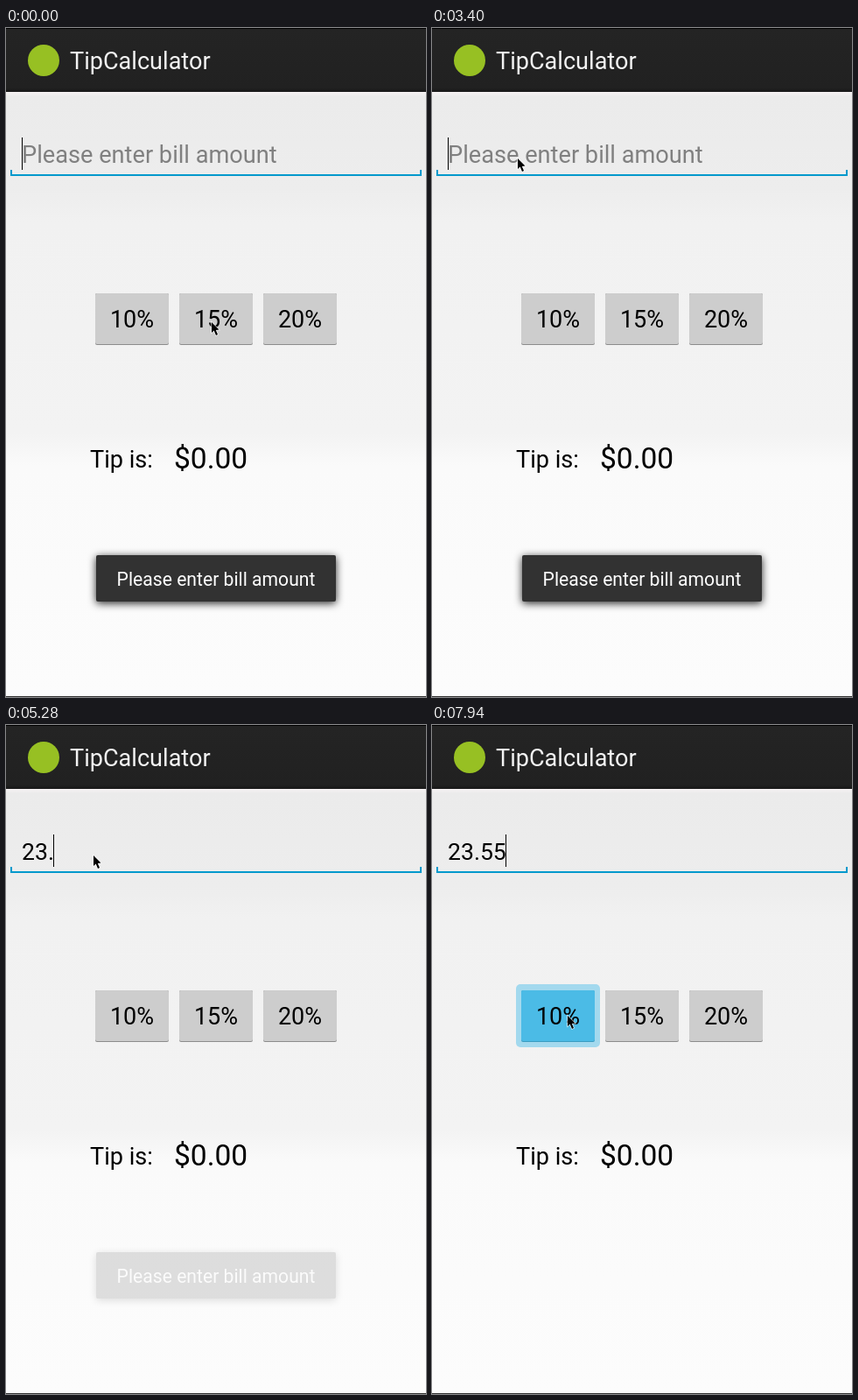
Write an HTML page with a canvas that moves like this. It is 480x764 px and loops after 8000 ms.

```html
<!DOCTYPE html>
<html lang="en">
<head>
<meta charset="utf-8">
<title>TipCalculator</title>
<style>
  html, body { margin: 0; width: 100%; height: 100%; overflow: hidden; background: #fbfbfb; }
  canvas { display: block; width: 480px; height: 764px; }
</style>
</head>
<body>
<canvas id="stage" width="480" height="764"></canvas>
<script>
const stage = document.getElementById('stage');
let ctx = stage.getContext('2d');

const LOOP = 8000;
const HINT = 'Please enter bill amount';
const AMOUNT = '23.55';
const FIELD_X = 18;
const BLINK = 500;
const HOLO_BLUE = '#0099cc';

const keyTimes = [4110, 4360, 5280, 5830, 5935];
const pressTimes = { '10%': 7940, '15%': 150, '20%': 1920 };
const pressLength = 150;

// The toast is replaced by the next one at a fixed interval; the last one fades out.
const toast = { first: 740, every: 2090, count: 3, fade: 480 };

const mouseStart = [235, 336];
const mouseMoves = [
  { start: 700, length: 430, to: [324, 339] },
  { start: 2100, length: 600, to: [98, 149] },
  { start: 3500, length: 100, to: [100, 149] },
  { start: 6430, length: 10, to: [111, 149] },
  { start: 6990, length: 10, to: [111, 190] },
  { start: 7010, length: 740, to: [155, 332] }
];

const ease = p => (1 - Math.cos(Math.PI * Math.min(1, Math.max(0, p)))) / 2;

function mouseAt(time) {
  let [x, y] = mouseStart;
  for (const { start, length, to } of mouseMoves) {
    const p = ease((time - start) / length);
    x += (to[0] - x) * p;
    y += (to[1] - y) * p;
  }
  return [x, y];
}

function toastAlpha(time) {
  const { first, every, count, fade } = toast;
  const index = Math.floor((time - first) / every);
  if (index < 0) return 1;
  if (index >= count) return 0;
  const p = ease((time - first - index * every) / fade);
  return index === count - 1 ? 1 - p : 1 - p * (1 - p);
}

function fieldAt(time) {
  const typed = keyTimes.filter(key => key <= time).length;
  const since = time - (typed ? keyTimes[typed - 1] : 0);
  return { value: AMOUNT.slice(0, typed), caret: Math.floor(since / BLINK) % 2 === 0 };
}

function rect(x, y, w, h, color) {
  ctx.fillStyle = color;
  ctx.fillRect(x, y, w, h);
}

function roundRect(x, y, w, h, r, color) {
  ctx.fillStyle = color;
  ctx.beginPath();
  ctx.roundRect(x, y, w, h, r);
  ctx.fill();
}

function text(str, x, y, size, color, align = 'left') {
  ctx.font = size + 'px Roboto, sans-serif';
  ctx.textAlign = align;
  ctx.fillStyle = color;
  ctx.fillText(str, x, y);
}

function vertical(y0, y1, stops) {
  const g = ctx.createLinearGradient(0, y0, 0, y1);
  for (const [y, color] of stops) g.addColorStop((y - y0) / (y1 - y0), color);
  return g;
}

const pageFill = vertical(73, 764, [
  [73, '#f6f2f3'], [78, '#ebebeb'], [185, '#ededed'], [222, '#f1f1f1'],
  [462, '#f3f3f3'], [500, '#fafafa'], [764, '#fcfcfc']
]);
const barFill = vertical(0, 73, [[0, '#242424'], [68, '#212121'], [73, '#181818']]);

function drawPage() {
  rect(0, 0, 480, 764, pageFill);
  rect(0, 0, 480, 73, barFill);
  rect(0, 0, 480, 1, '#000');
  rect(0, 763, 480, 1, '#333');
  roundRect(25, 19, 36, 36, 18, '#97c023');
  text('TipCalculator', 73, 47, 27.1, '#f3f3f3');
  text('Tip is:', 96, 502, 27.1, '#000');
  text('$0.00', 192, 503, 33.5, '#000');
}

function drawField({ value, caret }) {
  rect(5, 167, 470, 2, HOLO_BLUE);
  for (const x of [5, 473]) rect(x, 162, 2, 6, HOLO_BLUE);
  if (value) text(value, FIELD_X, 154, 26.6, '#000');
  else text(HINT, FIELD_X, 154, 27.2, '#808080');
  if (caret) {
    const width = value ? ctx.measureText(value).width : 0;
    rect(Math.floor(FIELD_X + width), 125, 1, 37, '#000');
  }
}

function drawButton(label, x, pressed) {
  if (pressed) roundRect(x - 6, 296, 96, 72, 5, '#a3d9ee');
  roundRect(x, 303, 84, 59, 2, pressed ? '#3b9cc1' : '#8c8c8c');
  roundRect(x, 303, 84, 58, 2, pressed ? '#4bbbe6' : '#cdcdcd');
  text(label, x + 42, 342, 27, '#000', 'center');
}

// Painted once on its own layer, so that fading treats box, shadow and text as one.
function makeToast() {
  const layer = document.createElement('canvas');
  layer.width = stage.width;
  layer.height = stage.height;
  const page = ctx;
  ctx = layer.getContext('2d');
  ctx.shadowColor = 'rgba(0,0,0,0.85)';
  ctx.shadowBlur = 10;
  ctx.shadowOffsetY = 2;
  roundRect(103, 602, 274, 53, 2, '#323232');
  ctx.shadowColor = 'transparent';
  text(HINT, 240, 637, 21.15, '#fff', 'center');
  ctx = page;
  return layer;
}
const toastLayer = makeToast();

function drawToast(alpha) {
  ctx.globalAlpha = alpha;
  ctx.drawImage(toastLayer, 0, 0);
  ctx.globalAlpha = 1;
}

const pointer = new Path2D('M0 0V12L2.7 9.6L5 15L7 14L4.8 9L8.5 8.6Z');

function drawMouse([x, y]) {
  ctx.save();
  ctx.translate(Math.round(x), Math.round(y));
  ctx.strokeStyle = 'rgba(255,255,255,0.8)';
  ctx.lineWidth = 1.4;
  ctx.stroke(pointer);
  ctx.fillStyle = '#000';
  ctx.fill(pointer);
  ctx.restore();
}

function draw(time) {
  drawPage();
  drawField(fieldAt(time));
  Object.entries(pressTimes).forEach(([label, start], i) => {
    drawButton(label, 102 + 96 * i, time >= start && time < start + pressLength);
  });
  drawToast(toastAlpha(time));
  drawMouse(mouseAt(time));
}

const begin = performance.now();
function tick() {
  draw((performance.now() - begin) % LOOP);
  requestAnimationFrame(tick);
}
tick();
</script>
</body>
</html>
```
